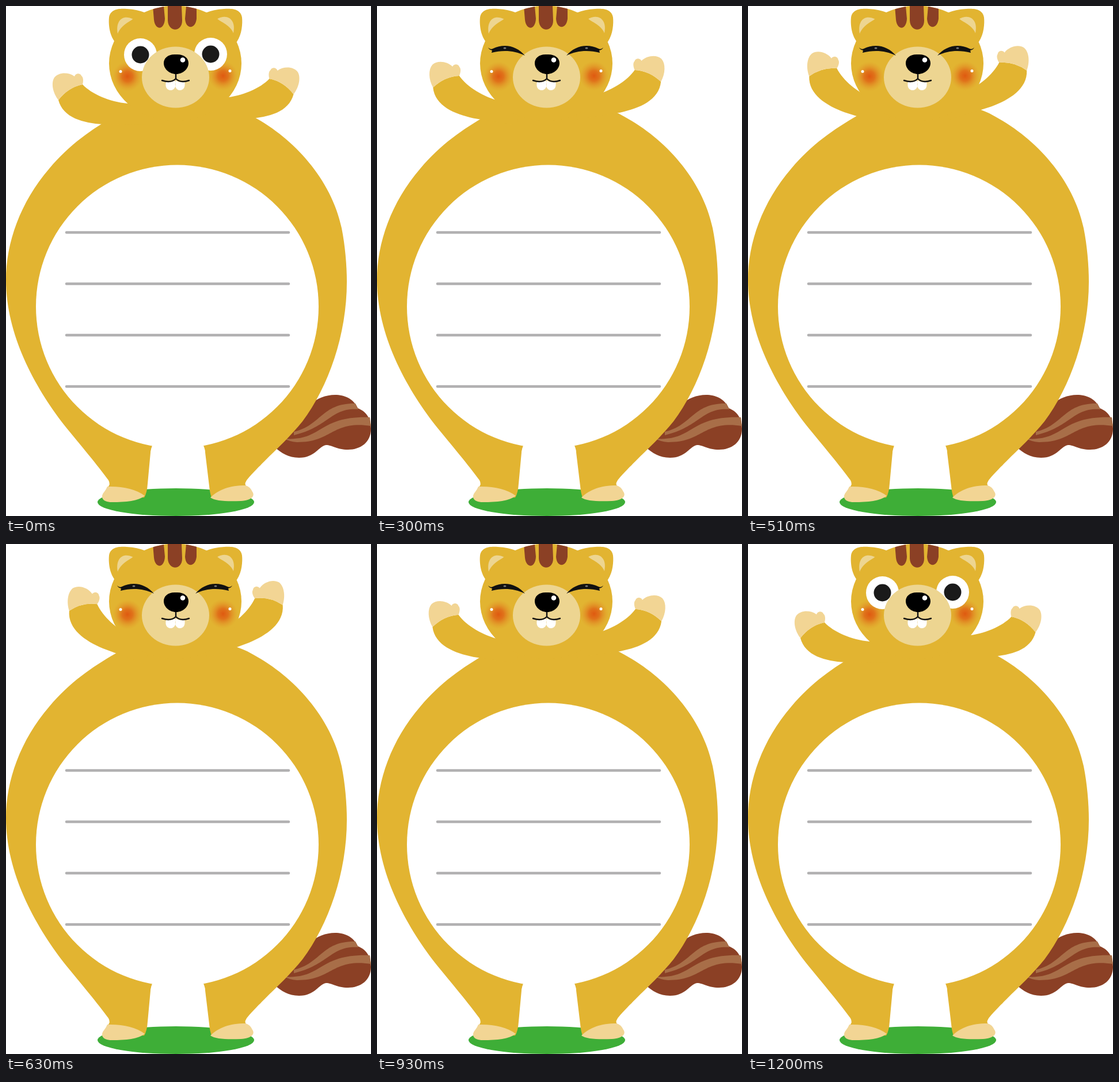
Recreate the animation shown at these times as an HTML page with a canvas. Size 634x884 px, loop 1.23 s.

```html
<!DOCTYPE html>
<html lang="en">
<head>
<meta charset="utf-8">
<title>Waving chipmunk</title>
<style>
  html, body { margin: 0; width: 100%; height: 100%; overflow: hidden; background: #fff; }
  canvas { display: block; }
</style>
</head>
<body>
<canvas id="stage" width="634" height="884"></canvas>
<script>
const ctx = document.getElementById('stage').getContext('2d');
const LOOP = 1230, STEP = 30, HALF = 600;
const GOLD = '#e2b431', CREAM = '#f2d594', MUZZLE = '#edd591',
      BROWN = '#8b4025', STRIPE = '#a86e48', INK = '#1a1a1a';

const shapes = {
  tail: 'M530 690 C548 671 596 664 611 697 C628 704 634 717 634 733 C634 756 616 769 594 769 C575 769 566 761 556 761 C543 763 537 783 509 783 C490 783 478 774 468 766 Z',
  tailStripes: 'M500 738 C548 727 548 688 607 689 L612 699 C564 696 562 729 500 744 Z M484 750 C550 755 542 710 632 713 L634 728 C565 718 567 757 505 756 Q492 755 484 750 Z',
  body: 'M230 168 L190 190 C150 213 110 240 75 282 C25 340 0 410 0 475 C0 570 50 660 100 725 C130 762 160 797 178 822 Q182 829 177 834 L205 850 L240 852 Q245 844 246 828 L251 774 Q254 749 275 749 L323 749 Q344 751 346 774 L353 832 Q354 844 357 852 L395 846 L417 832 Q414 828 417 824 C420 818 435 803 450 788 C470 768 495 745 515 720 C560 660 592 570 592 478 C592 450 589 415 583 385 C565 300 500 230 430 192 C415 183 405 180 398 178 L380 160 Z',
  gap: 'M251 774 Q254 749 282 748 L314 748 Q344 751 346 774 Z',
  leftFoot: 'M176 833 C201 832 226 837 241 849 C230 858 208 860 184 860 C166 860 164 850 170 843 Q174 838 176 833 Z',
  rightFoot: 'M416 831 C388 831 370 838 355 852 C363 858 383 859 408 858 C427 857 433 849 428 842 Q424 833 416 831 Z',
  arm: 'M91 163 C99 194 135 203 168 205 L245 206 L245 174 L211 169 C180 166 149 153 133 136 Q108 141 91 163 Z',
  hand: 'M91 163 C81 150 78 133 84 124 C91 115 108 114 119 122 C121 116 129 116 131 121 C134 123 135 129 133 136 Q108 141 91 163 Z',
  ears: 'M189 62 C179 49 178 30 179 20 C181 4 199 4 210 5 Q228 6 243 12 L260 60 Z M401 62 C410 49 411 30 410 20 C408 4 390 4 379 5 Q361 6 346 12 L330 60 Z',
  innerEars: 'M194 48 C190 25 203 14 221 23 Q199 34 194 48 Z M395 47 C400 24 385 12 366 23 Q390 34 395 47 Z',
  headStripes: 'M255 0 L274 0 L276 22 C275 43 259 42 257 24 Z M281 0 L305 0 L306 25 C306 46 282 46 281 25 Z M313 0 L331 0 L331 22 C329 41 312 41 311 22 Z',
  nose: 'M295 84 C309 83 317 90 317 99 C317 109 307 118 295.5 118 C284 118 274 109 274 99 C274 90 282 83 295 84 Z',
  teeth: 'M278 132 Q287 133 293 129 C297 138 293 146 286 146 C279 146 276 139 278 132 Z M310 132 Q301 133 295 129 C292 138 295 146 302 146 C309 146 312 139 310 132 Z',
  mouth: 'M295 117 V126 Q287 134 271 129 M295 126 Q303 134 318 129',
  lid: 'M193 72 Q197 76 201 74 C221 64 243 69 257 86 C239 77 219 76 199 81 L200 77 Q195 76 193 72 Z'
};
for (const name in shapes) shapes[name] = new Path2D(shapes[name]);

function fill(color, ...names) {
  ctx.fillStyle = color;
  names.forEach(name => ctx.fill(shapes[name]));
}

function oval(color, x, y, rx, ry = rx) {
  ctx.fillStyle = color;
  ctx.beginPath();
  ctx.ellipse(x, y, rx, ry, 0, 0, 2 * Math.PI);
  ctx.fill();
}

function mirrored(width, dy, draw) {
  ctx.save();
  ctx.translate(width, dy);
  ctx.scale(-1, 1);
  draw();
  ctx.restore();
}

function drawArm(angle) {
  ctx.save();
  ctx.translate(238, 194);
  ctx.rotate(angle * Math.PI / 180);
  ctx.translate(-238, -194);
  fill(GOLD, 'arm');
  fill(CREAM, 'hand');
  ctx.restore();
}

function drawBody() {
  fill(BROWN, 'tail');
  fill(STRIPE, 'tailStripes');
  oval('#3eae37', 295, 860, 136, 24);
  fill(GOLD, 'body');
  fill(CREAM, 'leftFoot', 'rightFoot');
  oval('#fff', 297.5, 521, 245.5);
  fill('#fff', 'gap');

  ctx.strokeStyle = '#b1b0b1';
  ctx.lineWidth = 4.5;
  ctx.lineCap = 'round';
  ctx.beginPath();
  for (let i = 0; i < 4; i++) {
    ctx.moveTo(105, 392.5 + 89 * i);
    ctx.lineTo(491, 392.5 + 89 * i);
  }
  ctx.stroke();
}

function drawCheek(x, y, dotX) {
  const glow = ctx.createRadialGradient(x, y, 0, x, y, 26);
  glow.addColorStop(0, '#df5a10');
  glow.addColorStop(0.35, 'rgba(223, 96, 20, .78)');
  glow.addColorStop(1, 'rgba(226, 150, 40, 0)');
  oval(glow, x, y, 26);
  return () => oval('#fff', dotX, y - 8.5, 2.5);
}

function drawLid() {
  fill('#111', 'lid');
  oval('#777', 222, 73, 2.5, 1.5);
}

function drawHead(eyesOpen) {
  fill(GOLD, 'ears');
  fill(MUZZLE, 'innerEars');
  oval(GOLD, 294, 99.5, 115, 100);
  ctx.save();
  ctx.clip();
  fill(BROWN, 'headStripes');
  ctx.restore();

  const dots = [drawCheek(211, 122, 199), drawCheek(377, 121, 389)];
  if (eyesOpen) {
    for (const [x, y] of [[233.5, 84.5], [355.5, 83.5]]) {
      oval('#fff', x, y, 28.5);
      oval(INK, x, y, 15);
    }
  }
  dots.forEach(dot => dot());
  oval(MUZZLE, 294.5, 123.5, 58.5, 53);
  if (!eyesOpen) {
    drawLid();
    mirrored(586, 0, drawLid);
  }

  fill('#fff', 'teeth');
  ctx.strokeStyle = '#111';
  ctx.lineWidth = 2.4;
  ctx.stroke(shapes.mouth);
  fill('#000', 'nose');
  oval('#fff', 307, 93.5, 4.3);
}

function render(now) {
  const t = Math.floor(now % LOOP / STEP) * STEP;
  const lift = Math.max(0, 1 - Math.abs(t - HALF) / HALF);
  const angle = 20.9 * lift * (0.65 + 0.35 * lift);

  ctx.fillStyle = '#fff';
  ctx.fillRect(0, 0, 634, 884);
  drawBody();
  drawArm(angle);
  mirrored(590.5, -10, () => drawArm(angle));
  drawHead(t < 240 || t >= 960);
}

const start = performance.now();
function tick() {
  render(performance.now() - start);
  requestAnimationFrame(tick);
}
tick();
</script>
</body>
</html>
```
